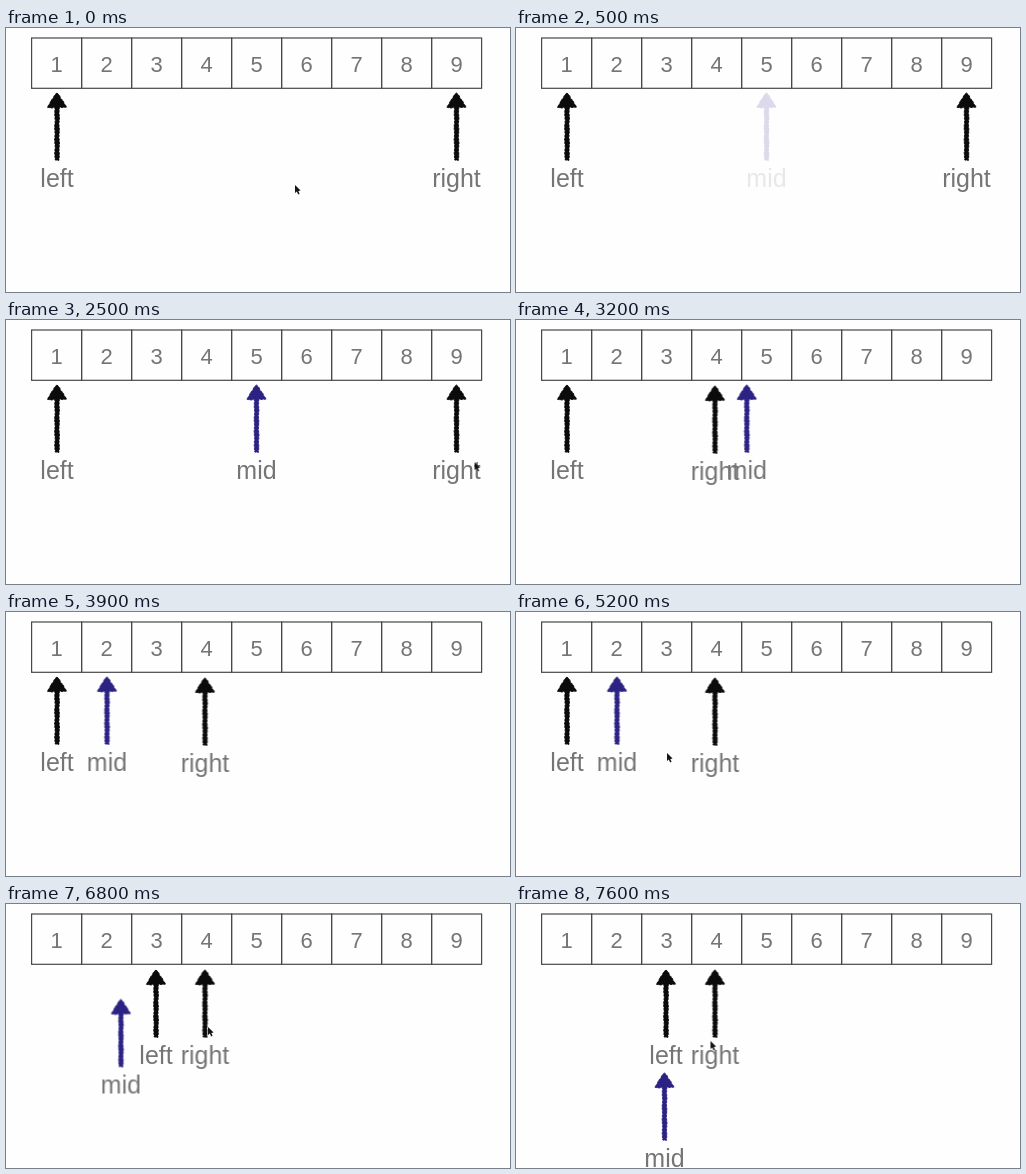
Write an HTML page that moves like this. It is 504 px wide and 264 px high and loops after 7.7 s.

```html
<!DOCTYPE html>
<html lang="en">
<head>
<meta charset="utf-8">
<title>Binary search</title>
<style>
  html, body { margin: 0; width: 100%; height: 100%; overflow: hidden; background: #fefefe; }
  svg { display: block; width: 504px; height: 264px; }
  text { font-family: "Liberation Sans", Arial, sans-serif; text-anchor: middle; fill: #757575; }
  .cells { font-size: 22px; }
  .cells rect { fill: none; stroke: #484848; stroke-width: 1.2; }
  .pointer { color: #0b0b0b; font-size: 25px; }
  #mid { color: #2c2284; }

  .pointer, #cursor { animation: 7.7s ease-in-out infinite; }
  #left { animation-name: left; }
  #right { animation-name: right; }
  #mid { animation-name: mid; }
  #cursor { animation-name: wander; }
  #cursor path { animation: show 7.7s step-end infinite; }

  @keyframes left {
    0%, 73.4% { transform: translate(51px, 65px); }
    81.2%, 100% { transform: translate(150px, 66px); }
  }
  @keyframes right {
    0%, 32.5% { transform: translate(450.5px, 65px); }
    35%, 100% { transform: translate(199px, 66px); }
  }
  @keyframes mid {
    0%, 4.5% { opacity: 0; transform: translate(250.5px, 65px); }
    11.7%, 39.6% { opacity: 1; transform: translate(250.5px, 65px); }
    47.4%, 85.4% { opacity: 1; transform: translate(101px, 65px); }
    93.2%, 100% { opacity: 1; transform: translate(148.5px, 169px); }
  }
  @keyframes wander {
    0%, 5% { transform: translate(289px, 157px); }
    10%, 18.2% { transform: translate(297px, 148px); }
    22.1% { transform: translate(192px, 50px); }
    27.3% { transform: translate(464px, 174px); }
    29.9% { transform: translate(469px, 178px); }
    32.5%, 33.7% { transform: translate(468.5px, 142px); }
    61% { transform: translate(42px, 74px); }
    67.5%, 70.1% { transform: translate(151px, 141px); }
    83.1% { transform: translate(170px, 150px); }
    88.3% { transform: translate(202px, 123px); }
    93.5% { transform: translate(200px, 104px); }
    98.7%, 100% { transform: translate(194.5px, 137px); }
  }
  @keyframes show {
    0% { opacity: 1; }
    3.8% { opacity: 0; }
    18.1% { opacity: .5; }
    19.4% { opacity: 1; }
    33.7% { opacity: 0; }
    61% { opacity: 1; }
    70.1% { opacity: 0; }
    83.1%, 100% { opacity: 1; }
  }
</style>
</head>
<body>
<svg viewBox="0 0 504 264">
  <defs>
    <!-- Rough pen arrow, tip at the origin -->
    <path id="arrow" fill="currentColor" stroke="currentColor" stroke-width=".9" stroke-dasharray="2.4 1.1"
      d="M0 0L2.6 2.4 3.6 5.2 6.2 8 7.2 10.6 9.8 14 6 14.6 2.4 14.2 2 20 2.5 25 1.9 31 2.4 37 1.9 44
         2.5 50 2 57 2.4 62 1.9 67.4 -1.8 67 -2.3 60 -1.8 54 -2.4 47 -1.9 41 -2.4 34 -1.8 28 -2.3 21
         -2 14.6 -6 15 -9.8 14.2 -7.4 10.8 -6 7.6 -3.8 5 -2.4 2z"/>
  </defs>
  <g class="cells" id="cells"></g>
  <g class="pointer" id="left"><use href="#arrow"/><text y="94">left</text></g>
  <g class="pointer" id="right"><use href="#arrow"/><text y="94">right</text></g>
  <g class="pointer" id="mid"><use href="#arrow"/><text y="94">mid</text></g>
  <g id="cursor">
    <path d="M0 0V8L1.8 6.5 3.2 9.4 4.6 8.7 3.3 5.9 5.6 5.6z"
      fill="#151515" stroke="#fff" stroke-opacity=".7" stroke-width=".8" paint-order="stroke"/>
  </g>
</svg>
<script>
  const cells = document.getElementById("cells");
  const add = (tag, attrs) => {
    const node = document.createElementNS("http://www.w3.org/2000/svg", tag);
    for (const key in attrs) node.setAttribute(key, attrs[key]);
    return cells.appendChild(node);
  };
  for (let i = 0; i < 9; i++) {
    const x = 25.6 + i * 50;
    add("rect", { x, y: 10, width: 50, height: 50.3 });
    add("text", { x: x + 25, y: 43.5 }).textContent = i + 1;
  }
</script>
</body>
</html>
```
